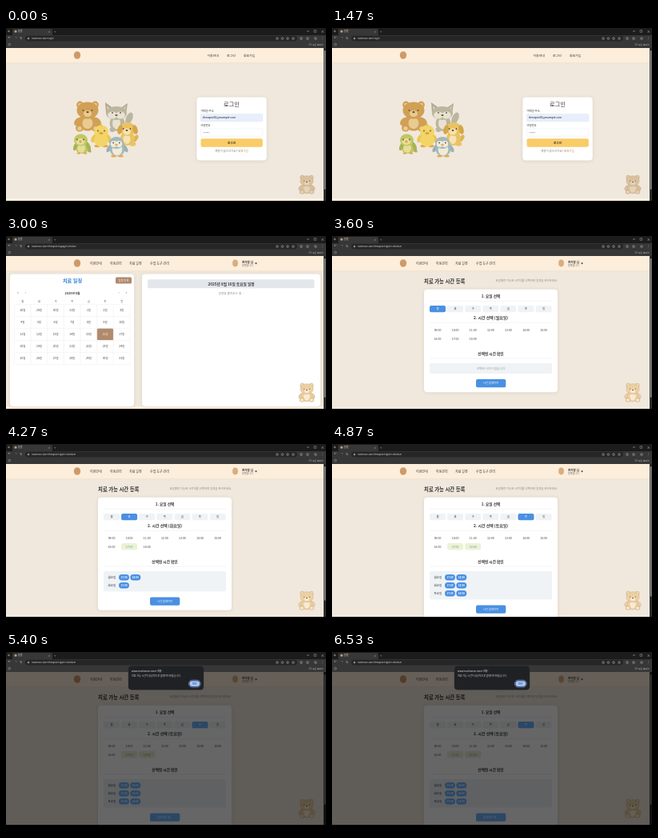
These frames come from a looping animation (400 px wide and 225 px high, 7140 ms). An HTML page with a canvas:

```html
<!DOCTYPE html>
<html lang="ko">
<head>
<meta charset="utf-8">
<style>
html, body { margin: 0; width: 100%; height: 100%; overflow: hidden; background: #000; }
canvas { display: block; width: 400px; height: 225px; }
</style>
</head>
<body>
<canvas id="stage"></canvas>
<script>
const LOOP = 7140, SCHEDULE = 1730, REGISTER = 3530, ALERT = 4930;
const TOP = 25, BOTTOM = 216;
const FONT = '"Noto Sans CJK KR", "Noto Sans CJK", "Noto Sans", sans-serif';
const DAYS = [...'월화수목금토일'];
const PICKED = [0, 1, 5];
const INK = '#333', GREY = '#888', BLUE = '#4a90e2', BROWN = '#b08a6c';

const canvas = document.getElementById('stage');
const dpr = window.devicePixelRatio || 1;
canvas.width = 400 * dpr;
canvas.height = 225 * dpr;
const c = canvas.getContext('2d');
c.scale(dpr, dpr);

const clamp = (v, lo, hi) => Math.max(lo, Math.min(hi, v));

function box(x, y, w, h, fill, r = 0, stroke, width = .4) {
  c.beginPath();
  c.roundRect(x, y, w, h, r);
  if (fill) { c.fillStyle = fill; c.fill(); }
  if (stroke) { c.strokeStyle = stroke; c.lineWidth = width; c.stroke(); }
}

function text(s, x, y, size, color = INK, align = 'left', weight = 400) {
  c.font = `${weight} ${size}px ${FONT}`;
  c.textAlign = align;
  c.fillStyle = color;
  c.fillText(s, x, y + size * .36);
}

const mid = (s, x, y, size, color, weight) => text(s, x, y, size, color, 'center', weight);

function oval(x, y, rx, ry, fill, turn = 0, stroke) {
  c.beginPath();
  c.ellipse(x, y, rx, ry, turn, 0, 7);
  c.fillStyle = fill;
  c.fill();
  if (stroke) { c.strokeStyle = stroke; c.lineWidth = .5; c.stroke(); }
}

// The same oval on both sides of x
function pair(x, dx, y, rx, ry, fill, turn = 0, stroke) {
  oval(x - dx, y, rx, ry, fill, turn, stroke);
  oval(x + dx, y, rx, ry, fill, -turn, stroke);
}

function path(points, fill) {
  c.beginPath();
  points.forEach(([x, y]) => c.lineTo(x, y));
  c.closePath();
  c.fillStyle = fill;
  c.fill();
}

function line(x1, y1, x2, y2, color, width = .5) {
  c.beginPath();
  c.moveTo(x1, y1);
  c.lineTo(x2, y2);
  c.strokeStyle = color;
  c.lineWidth = width;
  c.stroke();
}

function card(x, y, w, h) {
  c.save();
  c.shadowColor = 'rgba(90,65,30,.13)';
  c.shadowBlur = 4 * dpr;
  c.shadowOffsetY = .6 * dpr;
  box(x, y, w, h, '#fff', 4);
  c.restore();
}

function browser(url) {
  box(0, 0, 400, 9, '#1c1c1c');
  box(0, 9, 400, 16, '#373737');
  box(8, 1, 50, 9, '#373737', 2);
  oval(3.5, 4, 1.2, 1.2, '#777');
  oval(12, 4.3, 1.5, 1.5, '#c99b6d');
  text('봄결', 15, 4.3, 3, '#ddd');
  text('×', 52, 4.3, 3.5, '#bbb');
  text('+', 60, 4.3, 4, '#bbb');
  line(376, 4, 379, 4, '#ccc');
  box(385, 2.7, 2.6, 2.6, null, 0, '#ccc');
  text('×', 393.5, 4, 4.5, '#ccc');
  mid('←', 4.5, 13, 4, '#ccc');
  mid('→', 12, 13, 4, '#777');
  mid('↻', 19, 13, 4, '#ccc');
  box(24, 9.8, 340, 6.6, '#262626', 3.3);
  oval(28, 13.1, 1.3, 1.3, '#888');
  text(url, 32, 13, 2.7, '#ddd');
  for (const x of [339, 345.5, 352, 359, 369, 377, 387])
    box(x - 1.2, 11.9, 2.4, 2.4, null, .8, '#bbb', .6);
  mid('⋮', 395.5, 13, 4, '#ccc');
  box(3, 19.5, 2.4, 2.4, null, .4, '#aaa', .5);
  box(379, 19.6, 2.6, 2, null, .3, '#aaa', .4);
  text('모든 북마크', 383, 20.7, 2.8, '#ccc');
}

function page(member, thumbEnd) {
  box(0, TOP, 397, BOTTOM - TOP, '#f0e8dd');
  box(0, TOP, 397, 18.5, '#fdeedb');
  line(0, 43.6, 397, 43.6, '#e5d8c5', .4);
  box(397, TOP, 3, BOTTOM - TOP, '#2b2b2b');
  box(397.8, 28, 1.5, thumbEnd - 28, '#9f9f9f', .7);
  oval(89, 34, 4.2, 4.8, '#cf9a69');
  if (!member) {
    [['이용안내', 251.5], ['로그인', 276], ['회원가입', 297]]
      .forEach(([s, x]) => text(s, x, 34.5, 3.9, INK, 'left', 500));
    return;
  }
  [['이용안내', 105], ['아동관리', 130], ['치료 일정', 154], ['수업 도구 관리', 180]]
    .forEach(([s, x]) => text(s, x, 34.5, 4, INK, 'left', 500));
  oval(286.5, 34, 3.4, 4.4, '#d8ae7e');
  text('한가람 님', 295, 32.8, 3.6, INK, 'left', 700);
  text('환영합니다', 295, 36.6, 3, '#666');
  path([[311, 33.6], [314, 33.6], [312.5, 35.6]], INK);
}

const footer = () => box(0, 213, 397, BOTTOM - 213, '#fdf0de');

function face(x, y, gap, color = '#5e4a38') {
  pair(x, gap, y, .8, 1, color);
}

function bear(x, y, fur, light, edge) {
  pair(x, 9.5, y - 14, 4.4, 4.4, fur, 0, edge);
  pair(x, 9.5, y - 14, 2.3, 2.3, light);
  pair(x, 12, y + 7, 4, 6, fur, .7, edge);
  oval(x, y + 8, 11.5, 10.5, fur, 0, edge);
  oval(x, y + 9, 6.5, 7, light);
  pair(x, 10, y + 15, 5, 4.5, fur, 0, edge);
  pair(x, 10, y + 15.5, 2.7, 2.6, light);
  oval(x, y - 7, 13.5, 10.5, fur, 0, edge);
  oval(x, y - 3, 5, 4, light);
  face(x, y - 7, 5.5);
  oval(x, y - 4.8, 1.6, 1.1, '#6a4a34');
}

function wolf() {
  const fur = '#bcb59f', pale = '#e8e2d0';
  oval(154, 113, 4, 8, fur, .4);
  path([[125, 106], [124, 93], [135, 101]], '#b0a992');
  path([[142, 101], [152, 94], [150, 107]], '#b0a992');
  path([[127, 104], [126, 97], [131.5, 102]], '#e2d0ba');
  path([[145, 102], [150, 97], [148.5, 104]], '#e2d0ba');
  oval(139, 119, 9.5, 10, fur);
  oval(138, 119, 5, 7.5, pale);
  pair(139, 6, 127, 3.5, 3, fur);
  oval(138, 106.5, 13, 8.5, fur);
  pair(138, 5, 109, 5.8, 4.6, pale);
  face(138, 106, 5);
  oval(138, 109, 1.6, 1.1, '#5e5244');
}

function duck() {
  pair(119, 5, 147.5, 3.5, 1.7, '#e6a548');
  pair(119, 9, 138, 3, 5.5, '#ebc550', .5);
  oval(119, 140, 9, 8.5, '#f2d566');
  oval(119, 129.5, 9, 8, '#f2d566');
  oval(119, 121.5, 1.2, 2, '#ebc550');
  face(119, 128.5, 4);
  oval(119, 131.5, 2.6, 1.5, '#e39f45');
}

function dog() {
  const fur = '#e9c362', pale = '#f4e3b4';
  oval(162, 138, 2.5, 5, '#dfb350', .6);
  oval(152, 138, 9, 9, fur);
  oval(151, 139, 4.5, 6, pale);
  pair(152, 6.5, 145, 3.8, 2.7, fur);
  oval(152, 126.5, 10, 8.5, fur);
  pair(152, 9.5, 127, 3, 6, '#d6a548', .25);
  oval(151, 129.5, 4.8, 4, pale);
  face(151, 126, 4.4);
  oval(151, 128, 1.5, 1.1, '#5e4a38');
}

function parrot() {
  const body = '#bfc763';
  oval(102, 151, 2.4, 6, '#a9b257', -.8);
  oval(95, 148, 9, 9, body);
  oval(94, 150, 5, 6, '#e3de98');
  pair(95, 8, 148, 2.4, 5.5, '#a9b257', .4);
  oval(93.5, 140, 8.5, 7.5, body);
  oval(93, 142, 5.5, 4, '#e8df98');
  face(93, 139.5, 4);
  oval(93, 142, 1.8, 1.8, '#dfab52');
  pair(95, 4, 156.5, 2.4, 1.2, '#dfab52');
}

function penguin() {
  const body = '#a3b9bb', pale = '#f0eadb';
  pair(139, 9.5, 150, 2.6, 6, '#98b0b4', .6);
  oval(139, 151, 9.5, 9.5, body);
  oval(139, 152, 6.3, 7.5, pale);
  oval(138, 143.5, 9, 7.5, body);
  pair(138, 3.2, 145, 4, 4, pale);
  face(138, 143.5, 3.8);
  oval(138, 146, 1.8, 1.2, '#e3ab55');
  pair(139, 4.5, 160, 3.2, 1.5, '#e3ab55');
}

function mascot(fur, light) {
  c.save();
  c.translate(376, 195.5);
  c.scale(.6, .62);
  bear(0, 0, fur, light, '#b9986f');
  c.restore();
}

function login() {
  browser('malimoon.store/login');
  page(false, 202);
  footer();
  bear(102, 110, '#d0a055', '#e9cb92');
  [wolf, dog, duck, parrot, penguin].forEach(draw => draw());
  card(238.4, 86.6, 87.3, 79);
  mid('로그인', 282, 95.5, 7.2);
  text('이메일 주소', 243.5, 103.4, 3.4);
  box(243.5, 107.6, 77.3, 9.2, '#e8effc', 1.2, '#d9dfeb');
  text('therapist52@example.com', 246, 112.1, 3.3, '#111', 'left', 500);
  text('비밀번호', 243.5, 121.8, 3.3);
  box(243.5, 126, 77.3, 9.2, '#fff', 1.2, '#dde3ee');
  for (let i = 0; i < 7; i++) oval(246.8 + i * 1.2, 130.8, .45, .45, '#5a6a90');
  box(243.5, 138.2, 77.3, 10.6, '#f9cc68', 2);
  mid('로그인', 282, 143.3, 3.6, INK, 700);
  text('계정이 없으신가요?', 261, 154.2, 3.5, '#777');
  text('회원가입', 303, 154.2, 3.5, '#c08a4c', 'right');
  mascot('#d9c1a0', '#e5d3b8');
}

function schedule() {
  browser('malimoon.store/therapist/mypage/schedule');
  page(true, 202);
  footer();
  card(5, 47.5, 155, 165.5);
  card(170, 47.5, 223, 165.5);
  mid('치료 일정', 83, 55.7, 6.2, '#2f7fd6', 700);
  box(137, 51.5, 20, 8, BROWN, 1.5);
  mid('일정 등록', 147, 55.5, 3.3, '#fff');
  [['«', 15], ['‹', 24.5], ['›', 141], ['»', 150.5]].forEach(([s, x]) => mid(s, x, 71, 4, '#555'));
  mid('2025년 8월', 83, 71.3, 3.75, INK, 700);
  const step = 20.65, left = 10.5;
  DAYS.forEach((d, i) => mid(d, left + (i + .5) * step, 82, 3.2, '#555'));
  for (let i = 0; i < 35; i++) {
    const day = (i + 27) % 31 + 1, on = i === 19;
    const x = left + i % 7 * step, y = 85.5 + Math.floor(i / 7) * 15;
    box(x, y, step, 15, on ? BROWN : '#fff', on ? 1.5 : 0, '#ececec');
    mid(day + '일', x + step / 2, y + 7.5, 3.4, on ? '#fff' : INK);
  }
  box(177, 54.3, 208.5, 11, '#e3e7eb', 2);
  mid('2025년 8월 16일 토요일 일정', 281.5, 60, 4.7, INK, 700);
  mid('일정을 불러오는 중...', 281.5, 71.3, 3.7, GREY);
  mascot('#ecd0a4', '#f9ead0');
}

function register(t) {
  // Each day takes three steps: open it, pick 17:00, pick 18:00
  const step = clamp(Math.floor((t - 3600) / 145), 0, 8);
  const current = Math.floor(step / 3), today = PICKED[current];
  const count = i => clamp(step - 3 * i, 0, 2);
  const rows = PICKED.filter((_, i) => count(i)).length;
  const grow = rows ? rows * 10 - 7.5 : 0;
  const saving = t >= ALERT;
  const blue = saving ? '#6fb3ff' : BLUE;
  const colX = i => 132 + i * 22.1;

  browser('malimoon.store/therapist/register-schedule');
  page(true, 202 - grow / 2);
  c.save();
  c.beginPath();
  c.rect(0, TOP, 397, BOTTOM - TOP);
  c.clip();
  text('치료 가능 시간 등록', 115, 56.8, 6.4, INK, 'left', 700);
  text('요일별로 가능한 시간대를 선택하여 일정을 관리하세요.', 282, 56.2, 3.45, GREY, 'right');
  card(115, 66.7, 167, 128.5 + grow);
  mid('1. 요일 선택', 198.5, 75.7, 4.7, INK, 700);
  mid(`2. 시간 선택 (${DAYS[today]}요일)`, 198.5, 102.7, 4.9, INK, 700);
  mid('선택된 시간 확인', 198.5, 147.3, 4.7, INK, 700);
  [81.3, 108.3, 153].forEach(y => line(122, y, 275, y, '#e6e6e6', .5));
  DAYS.forEach((d, i) => {
    const on = i === today;
    box(colX(i) - 10, 87, 20, 8.3, on ? blue : '#eff3f6', 2);
    mid(d, colX(i), 91.2, 3.4, on ? '#fff' : INK, 500);
  });
  for (let i = 0; i < 10; i++) {
    const x = colX(i % 7), y = i < 7 ? 118 : 128.3;
    const on = i > 7 && count(current) > i - 8;
    if (on) box(x - 10, y - 4.2, 20, 8.4, '#edf2d6', 2);
    mid(String(i + 9).padStart(2, '0') + ':00', x, y, 3.5, on ? '#5b9c86' : INK);
  }
  box(122, 159, 153, 13 + grow, '#eff3f6', 2);
  if (!rows) mid('선택된 시간이 없습니다', 198.5, 165.5, 3.7, '#999');
  for (let i = 0; i < rows; i++) {
    const y = 166.8 + i * 10;
    text(DAYS[PICKED[i]] + '요일', 127.5, y, 3.6, INK, 'left', 500);
    for (let j = 0; j < count(i); j++) {
      box(141 + j * 14.3, y - 3.7, 13, 7.4, blue, 3.7);
      mid(17 + j + ':00', 147.5 + j * 14.3, y, 3, '#fff', 700);
    }
  }
  box(180, 179 + grow, 37.3, 10.2, blue, 2);
  mid(saving ? '업데이트 중...' : '시간 업데이트', 198.6, 184.1 + grow, 3.4, '#fff', 500);
  mascot('#ecd0a4', '#f9ead0');
  c.restore();
  if (saving) alertBox();
}

function alertBox() {
  box(0, TOP, 400, BOTTOM - TOP, 'rgba(0,0,0,.6)');
  box(153, 17.6, 94, 29.6, '#202124', 4, '#2c2e31');
  text('www.malimoon.store 내용:', 157, 24, 3.1, '#eee', 'left', 500);
  text('치료 가능 시간이 성공적으로 업데이트되었습니다.', 157, 29.7, 3, '#ddd');
  box(228.4, 35.2, 14.8, 8.8, null, 4.4, '#7faaf0', .7);
  box(229.4, 36.2, 12.8, 6.8, '#a8c7fa', 3.4);
  mid('확인', 235.8, 39.6, 3, '#123467', 500);
}

function frame(now) {
  const t = now % LOOP;
  box(0, 0, 400, 225, '#000');
  if (t < SCHEDULE) login();
  else if (t < REGISTER) schedule();
  else register(t);
  requestAnimationFrame(frame);
}
requestAnimationFrame(frame);
</script>
</body>
</html>
```
